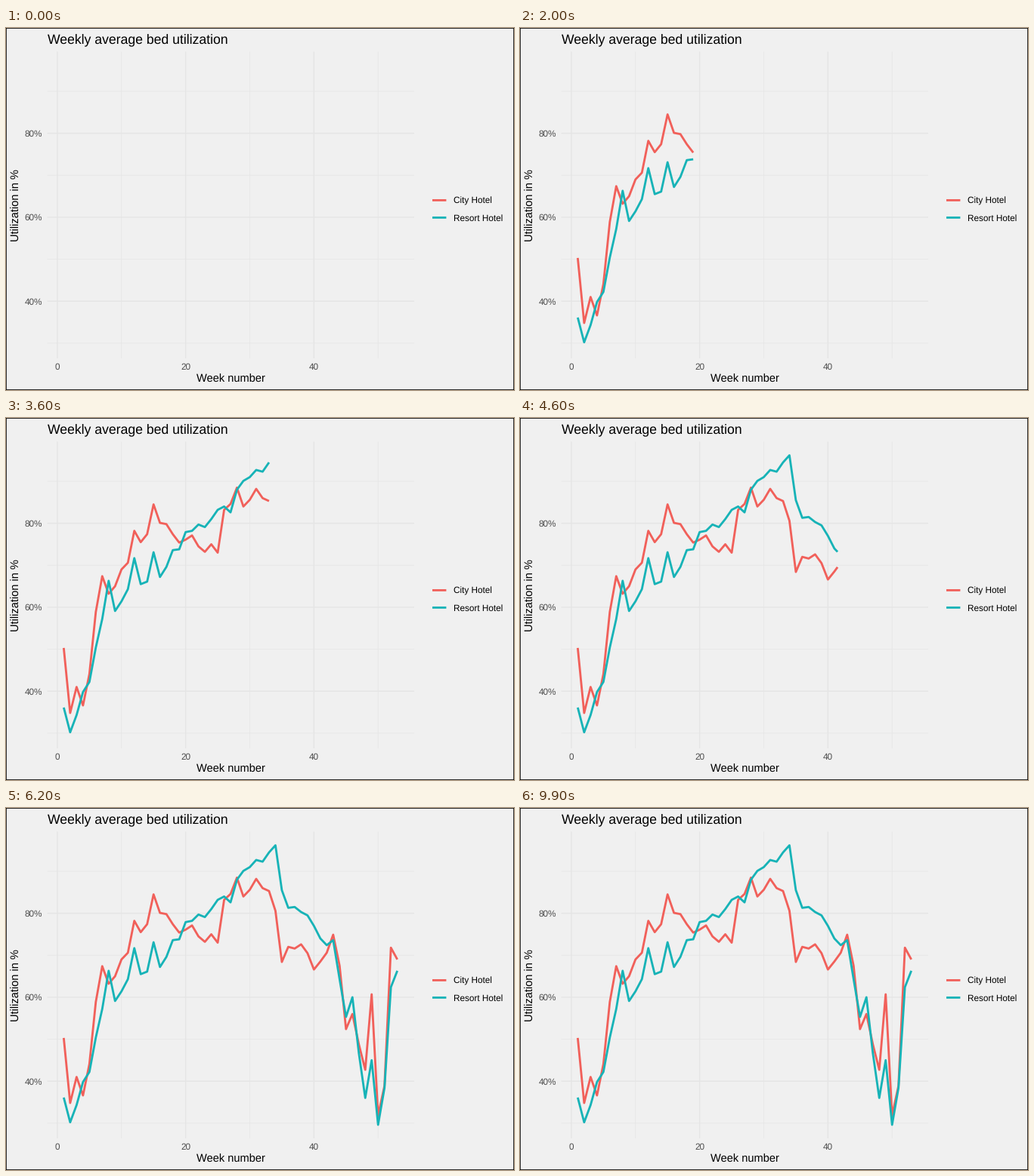
These frames come from a looping animation (672 by 480 pixels, 10000 ms). A matplotlib script:

```python
import numpy as np
import matplotlib.pyplot as plt
from matplotlib.animation import FuncAnimation
from matplotlib.patches import Rectangle

W, H, DPI = 672, 480, 72          # at 72 dpi one point is one pixel
FRAMES, REVEAL, INTERVAL = 100, 60, 100
LEFT, RIGHT, TOP, BOTTOM = 54.6, 540, 31.3, 438
BG, GRID, TICK = "#f0f0f0", "#e5e5e5", "#4d4d4d"
LINE = 2.845

plt.rcParams.update({
    "font.family": "Liberation Sans",
    "text.hinting": "none",
    "path.snap": False,
    "path.simplify": False,
})

CITY = [
    50.3, 34.8, 41.0, 36.6, 44.1, 58.9, 67.4, 63.2, 65.0, 69.0, 70.6,
    78.2, 75.5, 77.4, 84.5, 80.1, 79.8, 77.4, 75.4, 76.1, 77.1, 74.5,
    73.2, 75.0, 73.0, 83.2, 84.6, 88.5, 84.0, 85.6, 88.2, 86.0, 85.3,
    80.6, 68.4, 72.0, 71.6, 72.6, 70.5, 66.6, 68.5, 70.6, 74.9, 67.5,
    52.4, 56.0, 48.8, 42.7, 60.7, 31.8, 38.9, 71.8, 69.0,
]
RESORT = [
    36.1, 30.2, 34.3, 39.8, 42.2, 50.4, 57.2, 66.3, 59.1, 61.4, 64.3,
    71.7, 65.5, 66.1, 73.1, 67.2, 69.6, 73.6, 73.8, 77.9, 78.2, 79.7,
    79.1, 81.0, 83.2, 84.0, 82.6, 88.0, 90.1, 91.0, 92.7, 92.3, 94.5,
    96.2, 85.5, 81.3, 81.5, 80.3, 79.5, 77.0, 74.0, 72.4, 73.6, 64.3,
    55.3, 60.0, 46.7, 36.0, 45.0, 29.6, 38.4, 62.4, 66.3,
]
WEEKS = np.arange(1, 54)
SERIES = [
    ("City Hotel", "#f1605a", np.array(CITY), 228.4),
    ("Resort Hotel", "#17b3b7", np.array(RESORT), 251.4),
]
# Each week lands on a whole frame; frames in between are interpolated.
ARRIVAL = np.round((WEEKS - 1) * (REVEAL - 1) / (WEEKS[-1] - 1))


def px(week):
    return 67.9 + 8.486 * np.asarray(week)


def py(pct):
    return 139.6 + 5.565 * (80 - np.asarray(pct))


fig = plt.figure(figsize=(W / DPI, H / DPI), dpi=DPI, facecolor=BG)
ax = fig.add_axes([0, 0, 1, 1])
ax.set(xlim=(0, W), ylim=(H, 0))
ax.axis("off")


def rule(xs, ys, color, lw, z):
    return ax.plot(xs, ys, color=color, lw=lw, zorder=z,
                   solid_capstyle="butt", solid_joinstyle="round")[0]


def label(x, y, text, size, color="black", ha="left", **kw):
    ax.text(x, y, text, size=size, color=color, ha=ha,
            va="baseline", **kw)


def draw_grid():
    for pct in range(30, 91, 10):
        major = pct % 20 == 0
        rule([LEFT, RIGHT], [py(pct)] * 2, GRID, 1.42 if major else 0.71, 1)
        if major:
            label(47.8, py(pct) + 4.2, f"{pct}%", 11.73, TICK, "right")
    for week in range(0, 51, 10):
        major = week % 20 == 0
        rule([px(week)] * 2, [TOP, BOTTOM], GRID, 1.42 if major else 0.71, 1)
        if major:
            label(px(week), 453.3, str(week), 11.73, TICK, "center")


def draw_labels():
    label(54.6, 20, "Weekly average bed utilization", 17.6)
    label(297.2, 470, "Week number", 14.67, ha="center")
    ax.text(18, 235, "Utilization in %", size=14.67, rotation=90,
            rotation_mode="anchor", ha="center", va="baseline")
    for name, color, _, y in SERIES:
        rule([564, 582.4], [y, y], color, LINE, 2)
        label(592, y + 4.3, name, 11.73)


draw_grid()
draw_labels()
ax.add_patch(Rectangle((0, 0), W, H, fill=False, ec="black", lw=1.6))
curves = [rule([], [], color, LINE, 3) for _, color, _, _ in SERIES]


def update(frame):
    now = np.interp(frame, ARRIVAL, WEEKS)
    weeks = np.append(WEEKS[WEEKS < now], now)
    for curve, (_, _, values, _) in zip(curves, SERIES):
        curve.set_data(px(weeks), py(np.interp(weeks, WEEKS, values)))
    return curves


anim = FuncAnimation(fig, update, frames=FRAMES, interval=INTERVAL,
                     init_func=lambda: update(0), repeat=True,
                     repeat_delay=0)
plt.show()
```
